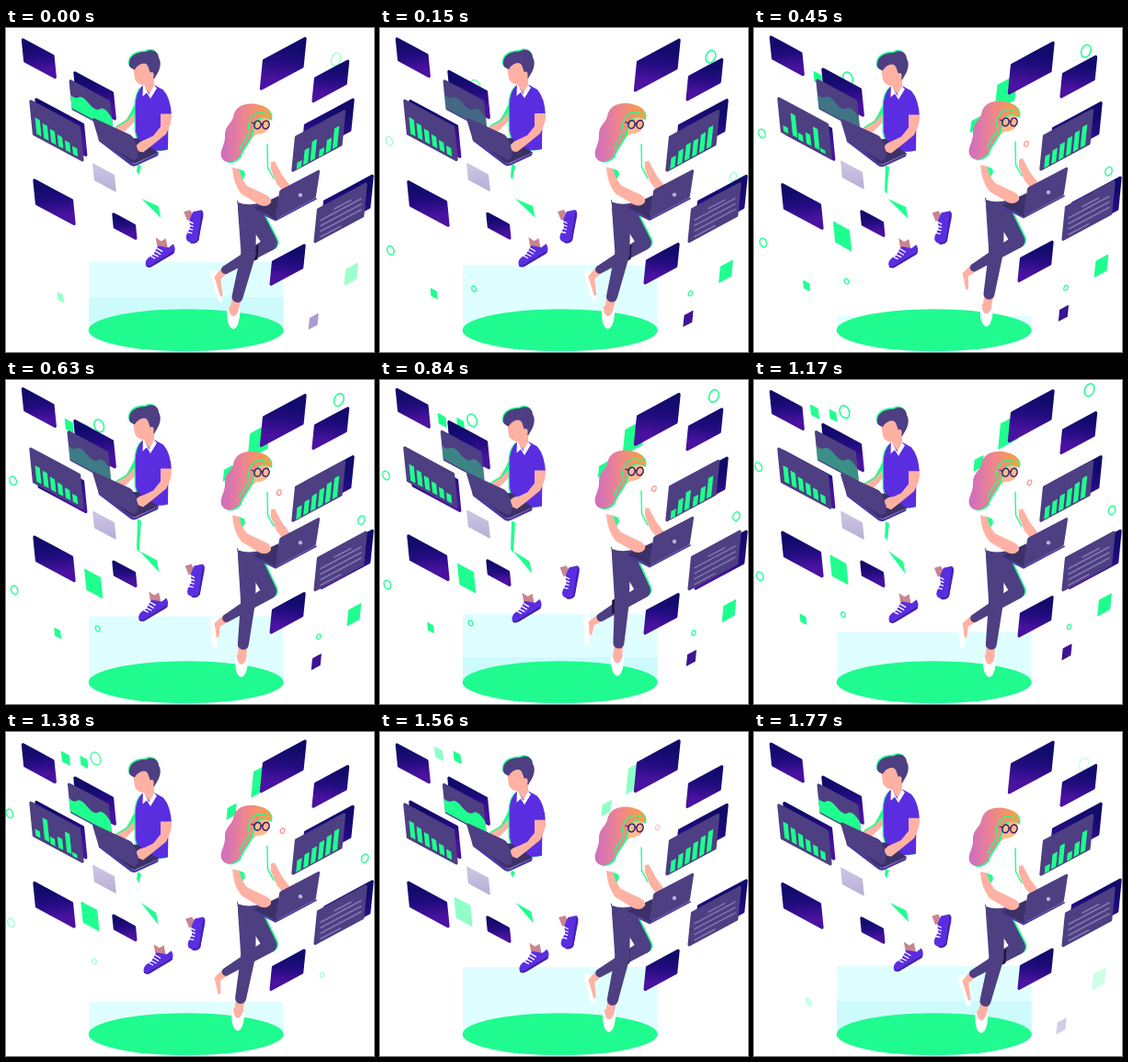
These frames come from a looping animation (400x353 px, 1.8 s). An HTML page with a canvas:

```html
<!DOCTYPE html>
<html lang="en">
<head>
<meta charset="utf-8">
<title>Floating workspace</title>
<style>
html, body { margin: 0; width: 100%; height: 100%; overflow: hidden; background: #fff; }
canvas { display: block; width: 400px; height: 353px; }
</style>
</head>
<body>
<canvas id="stage"></canvas>
<script>
const LOOP = 1800, STEP = 30, TAU = Math.PI * 2;
const GREEN = '#1fff8f', DARK = '#4d3f82', DEEP = '#3c3069', VIOLET = '#5a2ee0';
const EDGE = '#4a38a0', SOLE = '#42229f', SKIN = '#ffb1a3', ANKLE = '#c98590', PALE = '#b9b0d6';

const canvas = document.getElementById('stage');
const ctx = canvas.getContext('2d');
const ratio = window.devicePixelRatio || 1;
canvas.width = 400 * ratio;
canvas.height = 353 * ratio;

const mix = (a, b, k) => a + (b - a) * k;
const mixPt = (a, b, k) => a.map((v, i) => mix(v, b[i], k));
const clamp = v => Math.max(0, Math.min(1, v));

// 0..1 swing over one loop, highest at the given time
const sway = (t, peak) => 0.5 + 0.5 * Math.cos(TAU * (t - peak) / LOOP);

function poly(pts, fill) {
  ctx.beginPath();
  pts.forEach(p => ctx.lineTo(p[0], p[1]));
  ctx.closePath();
  ctx.fillStyle = fill;
  ctx.fill();
}

function shape(d, fill) {
  ctx.fillStyle = fill;
  ctx.fill(new Path2D(d));
}

function lines(d, color, width) {
  ctx.strokeStyle = color;
  ctx.lineWidth = width;
  ctx.lineCap = 'round';
  ctx.stroke(new Path2D(d));
}

function ring(x, y, rx, ry, tilt, color, width) {
  ctx.beginPath();
  ctx.ellipse(x, y, rx, ry, tilt, 0, TAU);
  ctx.strokeStyle = color;
  ctx.lineWidth = width;
  ctx.stroke();
}

function at(x, y, draw) {
  ctx.save();
  ctx.translate(x, y);
  draw();
  ctx.restore();
}

// Tapered segment with round ends
function limb(a, wa, b, wb, fill) {
  const ang = Math.atan2(b[1] - a[1], b[0] - a[0]);
  ctx.beginPath();
  ctx.arc(a[0], a[1], wa / 2, ang + Math.PI / 2, ang - Math.PI / 2);
  ctx.arc(b[0], b[1], wb / 2, ang - Math.PI / 2, ang + Math.PI / 2);
  ctx.closePath();
  ctx.fillStyle = fill;
  ctx.fill();
}

// Skewed card; it slopes down on the left half of the stage and up on the right
function card(x, y, w, h, fill, r = 1.6) {
  const side = x < 200 ? 1 : -1;
  const ux = w, uy = w * 0.54 * side, vx = h * 0.1 * side, vy = h;
  if (!fill) {
    fill = ctx.createLinearGradient(x + ux / 2, y + uy / 2, x + ux / 2 + vx, y + uy / 2 + vy);
    fill.addColorStop(0, '#120b6c');
    fill.addColorStop(0.45, '#220c80');
    fill.addColorStop(1, '#4a12a0');
  }
  const p = [[x, y], [x + ux, y + uy], [x + ux + vx, y + uy + vy], [x + vx, y + vy]];
  ctx.beginPath();
  ctx.moveTo(x + ux / 2, y + uy / 2);
  for (let i = 1; i <= 4; i++) {
    const a = p[i % 4], b = p[(i + 1) % 4];
    ctx.arcTo(a[0], a[1], b[0], b[1], r);
  }
  ctx.closePath();
  ctx.fillStyle = fill;
  ctx.fill();
}

// Floaters: x, y halfway up, size, time of appearing, colour
const RINGS = [
  [362, 21, 5, -60], [101, 49, 5, 60], [7.5, 109, 3.5, 90], [9, 228, 3.5, 10],
  [99.5, 270, 2.2, 10], [386.5, 152, 3.5, 90], [340, 279, 2, 10], [297, 122, 2.1, 200, '#ff8f8f']
];
const TILES = [
  [56, 275, 7, -60], [378.5, 255, 14, -60], [337.5, 306.5, 10, -60, '#3d1493'], [95, 221, 18, 200],
  [68.5, 49, 9, 200], [88.5, 53, 8, 560], [275, 66, 22, 200], [241.5, 101, 10, 200]
];

function floater(t, [x, y, size, start, color = GREEN], draw) {
  if (t > 1700) t -= LOOP;
  const alpha = Math.min(clamp((t - start) / 140), clamp((start + 1430 - t) / 140));
  if (!alpha) return;
  const side = x < 200 ? 1 : -1, k = (t - 660) / 1000;
  ctx.globalAlpha = alpha;
  draw(x - 5 * side * k, y - (side > 0 ? 28 : 20) * k, size, side, color);
  ctx.globalAlpha = 1;
}

function floaters(t) {
  for (const f of TILES) floater(t, f, (x, y, s, side, color) =>
    card(x - s * (0.5 + 0.065 * side), y - s * (0.65 + 0.27 * side), s, s * 1.3, color, 0.6));
  for (const f of RINGS) floater(t, f, (x, y, s, side, color) =>
    ring(x, y, s, s * 1.42, -0.4 * side, color, 1 + s * 0.1));
}

// The light column drops, shoots up again, and gets a second layer before each drop
function beam(t) {
  const p = t % 900;
  const top = p < 432 ? 74 * (1 - clamp(p / 420) ** 3) : 74 * (1 - clamp(1 - (p - 432) / 400) ** 5);
  ctx.fillStyle = '#dffeff';
  ctx.fillRect(90, 329 - top, 211.5, top);
  if (p > 780 || p < 60) {
    const low = p < 60 ? 36 : 36 * clamp((p - 780) / 80);
    ctx.fillStyle = '#cdfbfc';
    ctx.fillRect(90, 329 - low, 211.5, low);
  }
  ctx.beginPath();
  ctx.ellipse(195.7, 329.3, 106, 23, 0, 0, TAU);
  ctx.fillStyle = '#20fb90';
  ctx.fill();
}

// Six bars blending from an even ramp to a jagged profile
function bars(x, y, jag, calm, wild) {
  const side = x < 200 ? 1 : -1;
  for (let i = 0; i < 6; i++) {
    const h = mix(calm(i), wild(i), jag);
    card(x + i * 8.1, y + i * 4.4 * side - h, 5.3, h, GREEN, 0.3);
  }
}

function cards(t, w) {
  const drift = 7 * (sway(t, 600) - 0.25), late = 6 * sway(t, 900);
  const beat = Math.cos(TAU * t / 900);

  card(16.5, 10 - drift * 0.6, 36, 27);
  card(73, 46 - drift * 0.8, 44, 32);
  const lift = sway(t, 950);
  at(68.3 - 3 * lift, 55 - 1.5 * lift, () => {
    card(0, 0, 45, 34, DARK);
    ctx.transform(45, 24.3, 3.4, 34, 0, 0);
    ctx.globalAlpha = t < 60 || t > 1300 ? 1 : mix(0.18, 0.45, t / 1300);
    shape('M0,.52 Q.1,.6 .2,.46 T.45,.48 T.72,.46 T1,.55 V.95 H0Z', GREEN);
  });

  card(31, 75 + drift, 54, 37);
  const ly = 77 - 6 * w;
  card(25, ly, 56, 39.5, DARK);
  bars(31.5, ly + 38.5, Math.max(0, -beat) ** 3, i => 18 - 1.8 * i, i => 14 + 10.5 * Math.sin(2.3 * i - 0.78));

  card(29, 163 + drift, 44, 29.5);
  card(115, 200 - late, 26, 18);
  const fade = ctx.createLinearGradient(0, 152 - late, 0, 176 - late);
  fade.addColorStop(0, '#cbc4e2');
  fade.addColorStop(1, PALE);
  card(94, 147 - late, 24, 19, fade, 0.8);

  card(279, 34.5 + drift, 48, 34.5);
  card(335, 54 - drift, 38.5, 28.5);
  card(324, 105 + 7 * w, 55, 37);
  const ry = 118 - 2.5 * w;
  card(314, ry, 55.5, 40, DARK);
  bars(316.5, ry + 36, Math.max(0, beat) ** 3, i => 13 + 2 * i, i => 15 + 8 * Math.sin(2 * i - 1.8));

  card(345, 188 + 4 * w, 55, 38);
  const ty = 197 - 5 * w;
  card(338, ty, 55, 38.5, DARK);
  let text = `M357,${ty} l18,-9.5`;
  for (let i = 0; i < 4; i++) text += ` M342,${ty + 12.5 + 6 * i} l` + (i < 3 ? '44,-23.5' : '22,-11.7');
  lines(text, '#8376b0', 1.5);
  card(289, 254 - drift * 0.8, 37, 28);
}

const MAN_HAIR = 'M134,38 C134,30 142,25 152,25.5 C158,21.5 166,25 166,32 C169,36 168,44 164,50 L161,55 L157,49 L155,43 Q154,38.5 150,38 Q143,39 140,45 Q133,43 134,38Z';

function man(t) {
  const w = sway(t, 1060), dy = 6.4 * w, step = sway(t, 800);

  // Shaded folds of the white trousers
  const low = 158 + 31 * sway(t, 750);
  poly([[143, 148 + dy], [147, 150 + dy], [144 + w, low], [142, low - 4]], GREEN);
  poly([[147.5 - 3 * step, 186], [166 - 4 * w, 194 + 4 * w], [168.5 - 4 * w, 206.5 + 5 * w]], GREEN);

  at(-8.5 * step, 4.5 * w, () => {
    shape('M163,228 L169,232 L174,229 L176,239 L165,240Z', ANKLE);
    shape('M152,255 Q153,250 160,247 L166,237 L177,239 L182,235 Q186,241 182,246 L158,260 Q151,261 152,255Z', VIOLET);
    lines('M153.5,259 Q156,260.5 159,258.5 L182.5,244', SOLE, 1.8);
    lines('M165,240 l5,3 M163,243 l5,3 M160.5,246 l5,2.5 M158,248.5 l4,2', '#fff', 1.3);
  });
  at(w * 3, w * 4.8, () => {
    shape('M193,200 L200,198 L204,205 L197,210Z', ANKLE);
    shape('M199,209 L203,200 L212,198 Q215,199 214,206 L209,231 Q206,236 199,233 Q194,231 196,225 L200,217Z', VIOLET);
    lines('M213,201 L208.5,230.5 Q206,234.5 201,233.5', SOLE, 1.6);
    lines('M198,210 l5,2.5 M198,214 l5,2 M197.5,218 l5,1.5 M196.5,222 l5,1', '#fff', 1.3);
  });

  at(0, dy, () => {
    shape('M141,83 L143,98 L129,112 L117,113 L119,107 L130,100Z', SKIN);
    shape('M139,84 L132,99 L120,106 L119,108 L132,101 L141,90Z', GREEN);
    const shirt = 'M149,62 Q141,68 140.5,85 L141,112 L146,131 Q160,135 176,132 L176.5,98 L180,95 Q179,76 171,67 L162,62Z';
    at(-1.3, 0.5, () => shape(shirt, GREEN));
    shape(shirt, VIOLET);
    shape('M150,55 L161,50 L161,63 L157,72 L150,63Z', SKIN);
    shape('M149,60 L155.5,72 L161,62 L164,65 L157,76.5 L153,70 L148.5,74Z', '#fff');
    at(-1, -1.3, () => shape(MAN_HAIR, GREEN));
    shape('M138,41 L152,37 L157,46 L162,48 L161,57 Q157,63 151,62 Q142,61 140,55Z', SKIN);
    shape(MAN_HAIR, DARK);
    shape('M155,52 Q156,46 160,48 Q162,53 158,56Z', SKIN);
  });
  at(0, dy * 0.6, () => {
    shape('M100,119 L136,146 Q139,148.5 142,147 L166,135.5 L165,139 L141,150 Q138,151 135,149 L101,123Z', EDGE);
    poly([[100, 119], [136, 146.5], [140, 147.5], [166, 135.5], [143, 120]], DEEP);
  });
  at(0, dy, () => shape('M168,93 L180,93 Q181,102 174,115 L158,128 L149,135 L142,132 L145,124 L160,117 L168,107Z', SKIN));
  at(0, dy * 0.6, () => {
    shape('M94,99 Q95,97 98,99 L135,116 Q138,118 139,121 L144,132 L143,141 L139,144 L104,124 Q101,122 100,119Z', DARK);
    shape('M142,127 Q147,122 152,124 L152,131 L147,135 Q142,134 142,127Z', SKIN);
  });
}

const WOMAN_HAIR = 'M247,97 C249,84 262,80 276,84 C286,86 290,94 287,100 C281,95 274,96 270,103 L267,116 C262,127 256,132 254,140 C246,149 236,147 234,140 C232,133 239,126 238,116 C238,107 245,104 247,97Z';

function woman(w) {
  const dy = -6 * w;
  const hip = [262, 197 + dy], knee = mixPt([263.5, 246], [263, 240], w), ankle = mixPt([251.5, 293], [259.5, 286.5], w);
  const hip2 = [271, 206 + dy], knee2 = mixPt([287, 234], [286, 229], w), ankle2 = mixPt([238.5, 263.5], [240, 258.5], w);

  // Far foot
  const heel = mixPt([230, 272], [230, 265], w);
  limb(mixPt([225.5, 268], [225, 259], w), 7, mixPt([233, 296], [225, 287], w), 5, '#fff');
  limb(ankle2, 9, heel, 6.5, SKIN);
  limb(heel, 6, mixPt([234, 291], [229, 276], w), 3, SKIN);

  // Far leg
  const shift = p => [p[0] + 1.6, p[1] - 0.4];
  limb(shift(hip2), 19, shift(knee2), 16, GREEN);
  limb(hip2, 19, knee2, 16, DARK);
  limb([knee2[0], knee2[1] + 1], 15, ankle2, 9, DARK);
  at(mix(270.5, 256, w), 245, () => shape('M-4,-5 L4,-9 L3,7 L-4,10Z', '#1d1738'));

  // Near foot and leg
  const foot = mixPt([247, 314], [258, 308.5], w);
  limb(ankle, 10, [foot[0] + 0.5, foot[1] - 6], 9, SKIN);
  at(foot[0], foot[1], () => {
    shape('M-6,-10 Q-8,4 -4,11 Q0,17 4,11 Q8,3 7,-9 Q4,-1 0,-1 Q-4,-1 -6,-10Z', '#fff');
    shape('M-5,-10 Q0,-14 6,-9 Q4,0 0,0 Q-4,0 -5,-10Z', SKIN);
  });
  limb(hip, 20, knee, 16, DARK);
  limb(knee, 16, ankle, 12, DARK);

  at(0, dy, () => {
    shape('M251,188 L284,186 L280,210 L254,206Z', DARK);
    shape('M285,147 L292,145 L300,160 L309,172 L303,180 L294,169Z', SKIN);
    shape('M258,128 L280,120 L286,128 L288,148 L287,186 Q268,196 252,190 L256,160 L247,153 Q246,138 258,128Z', '#fff');
    lines('M284,127 L284.5,152 L291,164', GREEN, 1.4);
    shape('M251,153 L259,156 L260,160 L257,166Z', GREEN);

    // Laptop
    shape('M269,196 L296,183 L297,206 L293,209Z', DEEP);
    lines('M271,198.5 L293,209.5 L337,186', EDGE, 1.8);
    shape('M297,179 Q297,177 299,176 L339,155 Q341.5,154 341,157 L337,183 Q337,185 335,186 L294,208 L293,204Z', DARK);
    ctx.beginPath();
    ctx.arc(320, 182, 2.2, 0, TAU);
    ctx.fillStyle = PALE;
    ctx.fill();
    shape('M246,152 L253.5,154 Q256,165 262,172 L283,182 Q289,185 288,190 Q284,196 276,193 L256,181 Q247,170 246,152Z', SKIN);

    // Head
    shape('M266,98 L285,96 Q288,106 284,112 Q279,116 272,116 L265,122Z', '#ffb98c');
    at(1.6, 1, () => shape(WOMAN_HAIR, GREEN));
    const tint = ctx.createLinearGradient(234, 0, 289, 0);
    tint.addColorStop(0, '#cf6dc0');
    tint.addColorStop(0.45, '#ec8590');
    tint.addColorStop(1, '#ffa03e');
    shape(WOMAN_HAIR, tint);
    lines('M284,94 Q275,89 268,96 Q261,105 265,114 Q258,123 254,132', GREEN, 1.3);
    for (const x of [273.5, 282.5]) ring(x, 105.5, 3.6, 4.4, 0.25, '#3a1d6e', 1.5);
    lines('M277,104.5 L279,104.5 M270,104 L267,103', '#3a1d6e', 1.2);
  });
}

function draw() {
  const t = Math.floor(performance.now() % LOOP / STEP) * STEP;
  const w = sway(t, 900);
  ctx.setTransform(ratio, 0, 0, ratio, 0, 0);
  ctx.fillStyle = '#fff';
  ctx.fillRect(0, 0, 400, 353);
  beam(t);
  floaters(t);
  cards(t, w);
  man(t);
  woman(w);
  requestAnimationFrame(draw);
}
draw();
</script>
</body>
</html>
```
